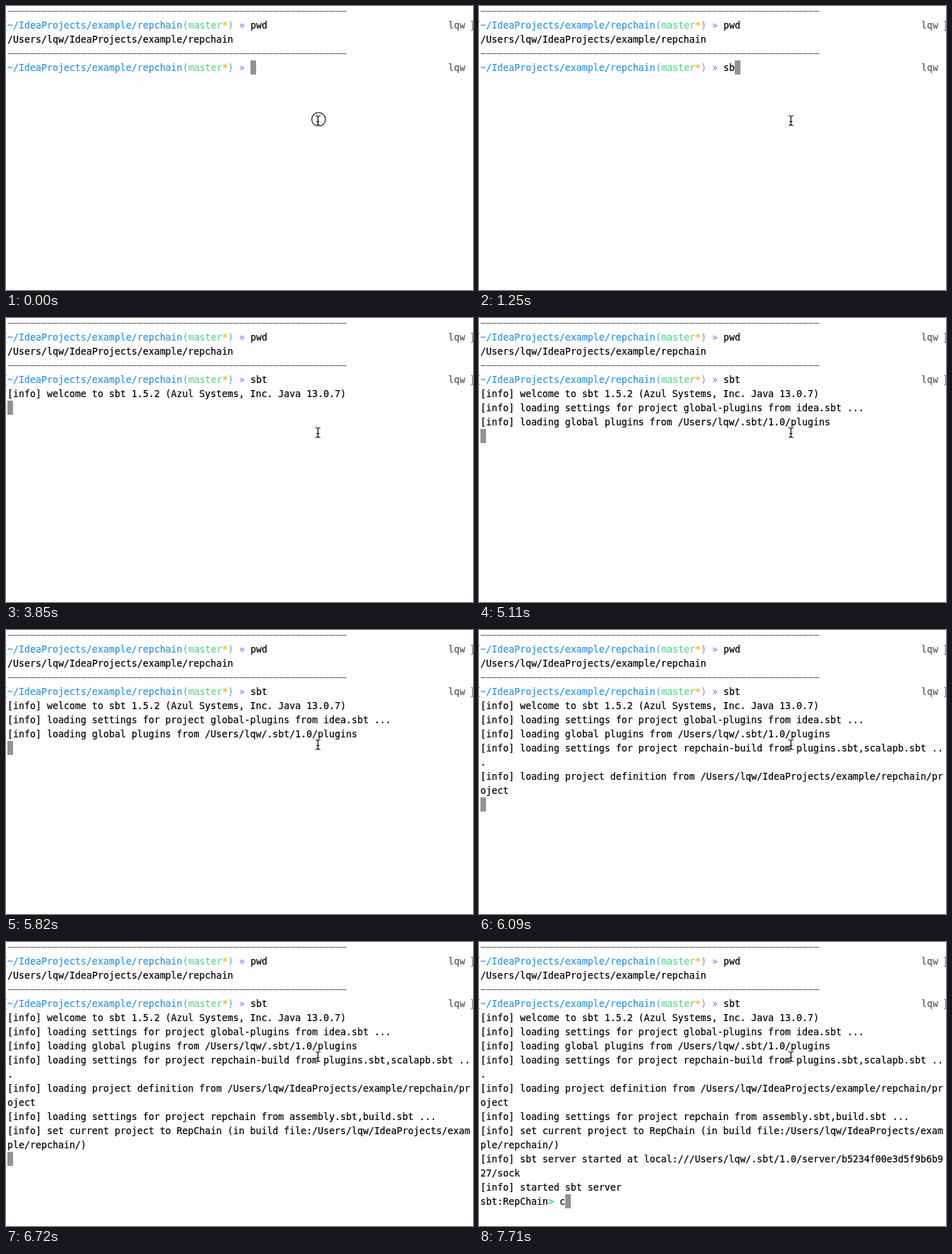
These frames come from a looping animation (661x402 px, 8000 ms). An HTML page:

```html
<!DOCTYPE html>
<html lang="en">
<head>
<meta charset="utf-8">
<title>Terminal session</title>
<style>
  html, body { margin: 0; width: 100%; height: 100%; overflow: hidden; background: #fefefe; }
  svg { display: block; width: 661px; height: 402px; }
  text {
    font: 13.288px "DejaVu Sans Mono", "Noto Sans Mono", monospace;
    white-space: pre;
    stroke-width: 0.2px;
  }
</style>
</head>
<body>
<svg id="stage" viewBox="0 0 661 402">
  <rect width="661" height="402" fill="#fefefe"/>
  <rect id="caret" width="8" height="20" fill="#929292"/>
  <g id="screen"></g>
  <g id="pointer" fill="none" stroke="#000">
    <circle id="ring" cx="442.5" cy="160.5" r="9.7" fill="#fefefe" stroke-width="1.1"/>
    <g id="beam">
      <path id="halo" stroke="#fff" stroke-width="3"/>
      <path id="ibeam" stroke-width="1.2"/>
    </g>
  </g>
</svg>
<script>
const NS = "http://www.w3.org/2000/svg";
const LOOP = 8000, CELL = 8, ROW = 20, LEFT = 2, TOP = -3;
const USER = "lqw";
const HOME = "/Users/" + USER;
const INK = "#000", GREY = "#5c5c5c";

const $ = id => document.getElementById(id);
const screen = $("screen");
const timed = [];

const colX = col => LEFT + col * CELL;
const rowY = row => TOP + row * ROW;

function add(tag, attrs, from = 0, to = LOOP) {
  const el = document.createElementNS(NS, tag);
  for (const key in attrs) el.setAttribute(key, attrs[key]);
  screen.appendChild(el);
  timed.push({ el, from, to });
  return el;
}

function write(row, col, str, fill = INK, from = 0, to = LOOP, weight = 400) {
  const attrs = { x: colX(col), y: rowY(row) + 15, fill, stroke: fill, "font-weight": weight };
  add("text", attrs, from, to).textContent = str;
}

function rule(row) {
  const d = `M2.5 ${rowY(row) + 10.5}H482`;
  add("path", { d, stroke: "#b0b0b0" });
  add("path", { d, stroke: "#5c5c5c", "stroke-dasharray": "7 1" });
}

// Marks at the window edges beside an entered command
function marks(row, from) {
  const y = rowY(row) + 4.5;
  add("path", { d: `M0 ${y}h1.5M0 ${y + 13}h1.5`, stroke: "#a8a8a8" }, from);
  add("path", { d: `M658 ${y}h2.5v13h-2.5`, stroke: "#777", fill: "none" }, from);
}

function prompt(row, entered) {
  write(row, 0, "~/IdeaProjects/example/repchain", "#2f95ea");
  write(row, 31, "(", "#5fafff");
  write(row, 32, "master", "#5fd78f");
  write(row, 38, "*", "#ffaf00", 0, LOOP, 700);
  write(row, 39, ")", "#5fafff");
  write(row, 41, "»", "#8787ff");
  write(row, 78, USER, GREY);
  marks(row, entered);
}

rule(0);
prompt(1, 0);
write(1, 43, "pwd");
write(2, 0, HOME + "/IdeaProjects/example/repchain");
rule(3);
prompt(4, 2060);

// Typed characters: time, row, column, character
for (const [at, row, col, ch] of [
  [890, 4, 43, "s"], [1250, 4, 44, "b"], [1520, 4, 45, "t"], [7710, 18, 14, "c"]
]) write(row, col, ch, INK, at);

// Command output: time, first row, lines
for (const [at, row, ...lines] of [
  [3850, 5, "[info] welcome to sbt 1.5.2 (Azul Systems, Inc. Java 13.0.7)"],
  [4480, 6, "[info] loading settings for project global-plugins from idea.sbt ..."],
  [5110, 7, `[info] loading global plugins from ${HOME}/.sbt/1.0/plugins`],
  [6000, 8, "[info] loading settings for project repchain-build from plugins.sbt,scalapb.sbt ..", "."],
  [6090, 10, `[info] loading project definition from ${HOME}/IdeaProjects/example/repchain/pr`, "oject"],
  [6540, 12, "[info] loading settings for project repchain from assembly.sbt,build.sbt ..."],
  [6720, 13, `[info] set current project to RepChain (in build file:${HOME}/IdeaProjects/exam`, "ple/repchain/)"],
  [6810, 15, `[info] sbt server started at local://${HOME}/.sbt/1.0/server/b5234f00e3d5f9b6b9`, "27/sock"],
  [6900, 17, "[info] started sbt server", "sbt:RepChain"]
]) lines.forEach((line, i) => write(row + i, 0, line, INK, at));
write(18, 12, ">", "#1fb8bd", 6900);

// Short-lived progress lines
write(9, 0, "  | => global-plugins / update 0s", INK, 5380, 5820);
write(13, 0, "  | => repchain-build / update 0s", INK, 6180, 6270);

// Caret: time, row, column
const caretSteps = [
  [0, 4, 43], [890, 4, 44], [1250, 4, 45], [1520, 4, 46], [2060, 5, 0],
  [3850, 6, 0], [4480, 7, 0], [5110, 8, 0], [6000, 10, 0], [6090, 12, 0],
  [6540, 13, 0], [6720, 15, 0], [6810, 17, 0], [6900, 18, 14], [7710, 18, 15]
];

const beam = "M438 155.5h1.5q2 0 2 2v9.5q0 2-2 2h-1.5" +
  "M445 155.5h-1.5q-2 0-2 2v9.5q0 2 2 2h1.5M439.5 163.5h4";
$("halo").setAttribute("d", beam);
$("ibeam").setAttribute("d", beam);
timed.push({ el: $("ring"), from: 0, to: 90 });

const caret = $("caret");
function draw() {
  const t = performance.now() % LOOP;
  for (const { el, from, to } of timed) {
    el.style.visibility = t >= from && t < to ? "visible" : "hidden";
  }
  const [, row, col] = caretSteps.filter(step => step[0] <= t).pop();
  caret.setAttribute("x", colX(col));
  caret.setAttribute("y", rowY(row));
  requestAnimationFrame(draw);
}
draw();
</script>
</body>
</html>
```
